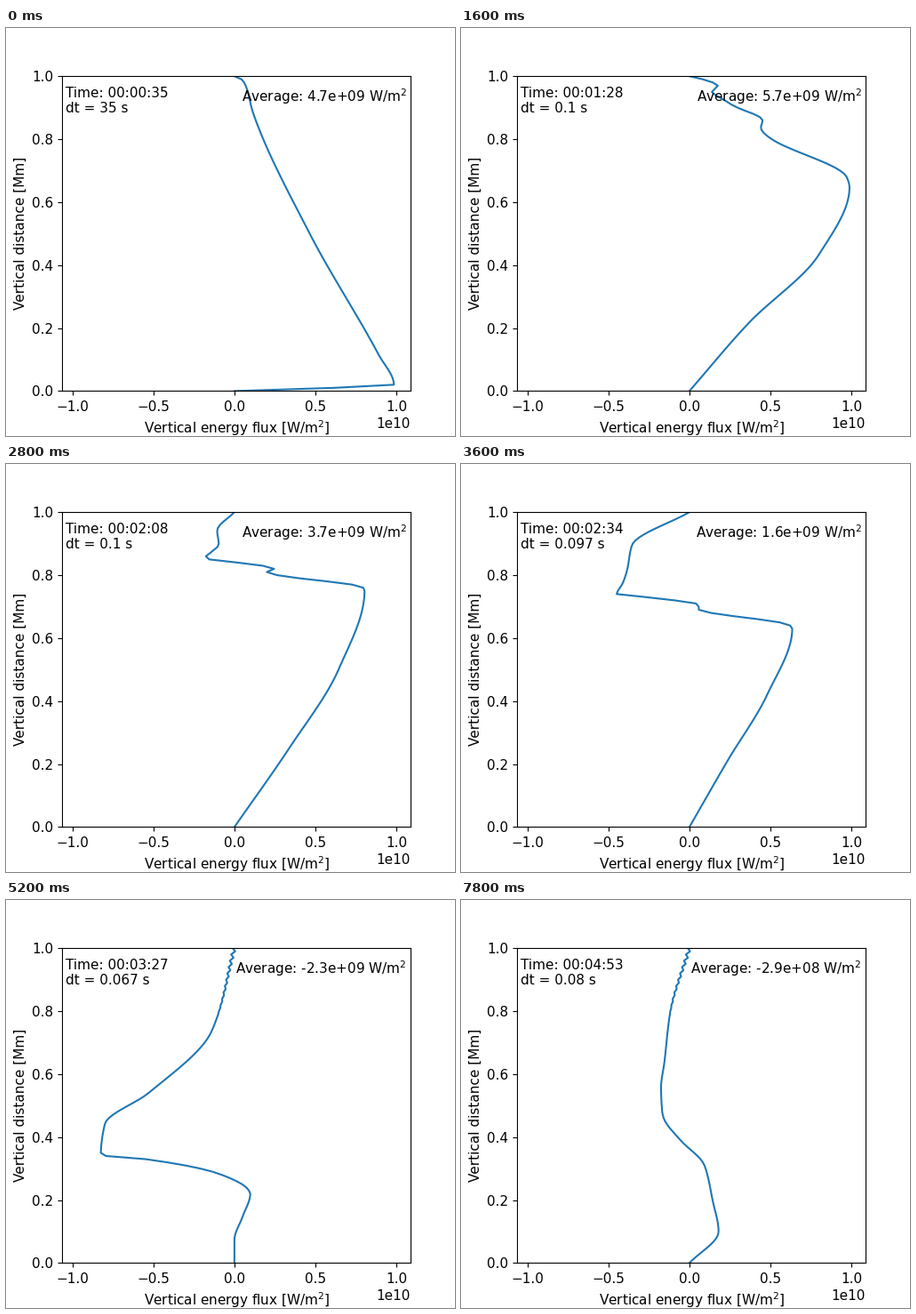
Recreate the animation shown at these times as a matplotlib script. Size 505x459 px, loop 8 s.

```python
import numpy as np
import matplotlib.pyplot as plt
from matplotlib.animation import FuncAnimation

FRAMES, INTERVAL = 40, 200
W, H, DPI = 505, 459, 100
UNIT = 1e10

# Knots sit at fixed fractions of the three zones: below, across and above the front
BELOW = np.array([1, 2, 3]) / 3
ACROSS = np.array([.1, .5, .9, 1])
ABOVE = np.array([.15, .3, .6, 1])

# step, average, time step, front's lower and upper edge, flux at the inner knots
KEYS = np.array([
    [0, 4.7e9, .09, .02, .98, .45, .75, .985, .89, .465, .115, .06, .055, .05, .04],
    [4, 6.3e9, .087, .39, .97, .3, .84, 1.067, 1.035, .705, .38, .3, .28, .255, .22],
    [11, 5.3e9, .11, .84, .94, .415, .765, .93, .927, .36, .1, .015, .065, .12, .08],
    [18, 1.6e9, .097, .63, .737, .235, .48, .635, .62, .1, -.17, -.45, -.41, -.385, -.355],
    [26, -2.3e9, .067, .22, .343, 0, .05, .098, .087, -.085, -.56, -.825, -.8, -.53, -.14],
    [32, -4e9, .11, .02, .07, -.2, -.38, -.52, -.63, -.96, -1.045, -1.055, -.905, -.49, -.185],
    [39, -2.9e8, .08, .3, .48, .18, .143, .1, .085, -.055, -.16, -.168, -.175, -.155, -.12],
])

height = np.linspace(0, 1, 101)
parity = np.where(np.arange(len(height)) % 2, 1, -1)


def monotone(q, x, y):
    """Monotone cubic interpolation of y(x) at q."""
    h, d = np.diff(x), np.diff(y) / np.diff(x)
    m = np.r_[d[0], np.zeros(len(x) - 2), d[-1]]
    same = d[:-1] * d[1:] > 0
    w1, w2 = 2 * h[1:] + h[:-1], h[1:] + 2 * h[:-1]
    lo, hi = np.where(same, d[:-1], 1), np.where(same, d[1:], 1)
    m[1:-1] = np.where(same, (w1 + w2) / (w1 / lo + w2 / hi), 0)
    k = np.clip(np.searchsorted(x, q, side="right") - 1, 0, len(h) - 1)
    t = (q - x[k]) / h[k]
    return (y[k] * (1 + 2 * t) * (1 - t) ** 2 + y[k + 1] * t * t * (3 - 2 * t)
            + h[k] * t * (1 - t) * (m[k] * (1 - t) - m[k + 1] * t))


def flux(step, low, high, knots):
    y = np.r_[0, low * BELOW, low + (high - low) * ACROSS, high + (1 - high) * ABOVE]
    x = monotone(height, y, np.r_[0, knots, 0])
    # Kick inside the front while it turns back from the top
    kick = np.interp(step, [4, 11, 26], [0, .17, 0])
    u = (height - low) / (high - low)
    x += kick * np.exp(-((u - .72) / .09) ** 2)
    # Grid-scale ripple near the top, growing late
    ripple = .01 * np.clip((step - 18) / 8, 0, 1)
    x += ripple * parity * np.clip((height - .78) / .2, 0, 1)
    return x * UNIT


plt.rcParams["font.family"] = "DejaVu Sans"
plt.rcParams["font.size"] = 11
fig, ax = plt.subplots(figsize=((W + 1e-6) / DPI, (H + 1e-6) / DPI), dpi=DPI)
fig.subplots_adjust(left=.125, right=.9, bottom=50.6 / H, top=404.8 / H)
ax.set_xlim(-1.064 * UNIT, 1.085 * UNIT)
ax.set_ylim(0, 1)
ax.tick_params(axis="x", pad=4.3)
ax.set_xlabel("Vertical energy flux [W/m$^2$]", x=.5025)
ax.set_ylabel("Vertical distance [Mm]")
line, = ax.plot([], [], color="#1f77b4", lw=1.5)
clock = ax.text(.01, .9675, "", va="top", transform=ax.transAxes)
mean = ax.text(.99, .9645, "", va="top", ha="right", transform=ax.transAxes)


def draw(step):
    avg, dt, low, high, *knots = [np.interp(step, KEYS[:, 0], c) for c in KEYS.T[1:]]
    line.set_data(flux(step, low, high, knots), height)
    sec = int(35.5 + 6.612 * step)
    dt = dt if step else sec
    clock.set_text(f"Time: 00:{sec // 60:02d}:{sec % 60:02d}\ndt = {dt:.2g} s")
    mean.set_text(f"Average: {avg:.2g} W/m$^2$")
    return line, clock, mean


anim = FuncAnimation(fig, draw, frames=FRAMES, interval=INTERVAL,
                     init_func=lambda: draw(0), repeat=True)
plt.show()
```
